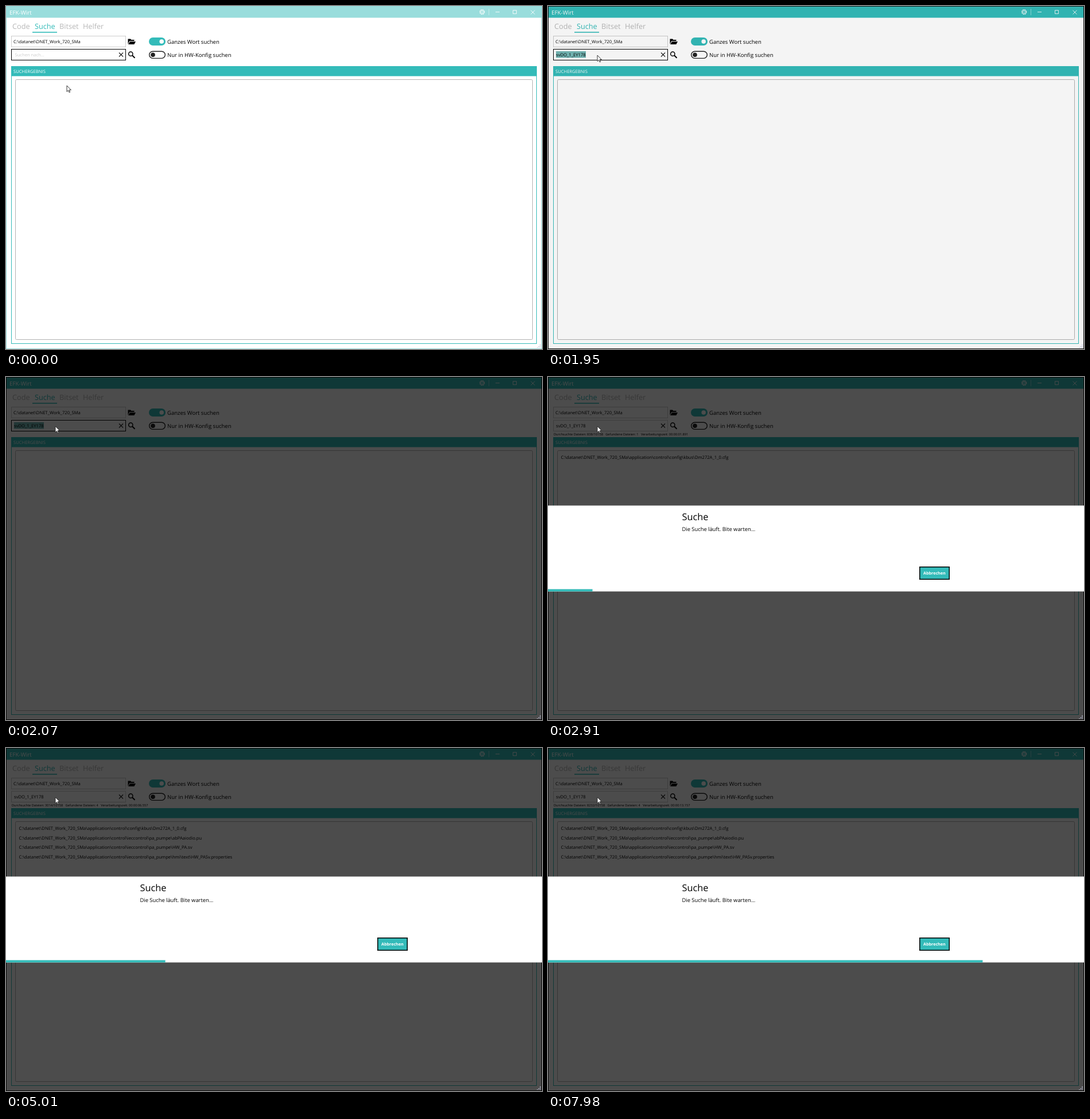
An HTML page that plays this animation: 934x599 px, repeating every 8000 ms.

```html
<!DOCTYPE html>
<html lang="de">
<head>
<meta charset="utf-8">
<title>Suche</title>
<style>
  html, body { margin: 0; width: 100%; height: 100%; overflow: hidden; background: #fff; }
  svg { display: block; width: 934px; height: 599px; }
  text {
    font-family: "Open Sans", "Noto Sans", sans-serif; font-size: 7.62px;
    text-rendering: geometricPrecision; white-space: pre;
  }
  .tab { font-size: 12.7px; fill: #b8b8b8; }
  .label { font-size: 9.5px; }
  .teal { fill: #33bbb9; }
  .white { fill: #fff; }
  .line { fill: none; stroke: #b2b2b2; }
  .icon { fill: none; stroke: #fff; opacity: .85; }
</style>
</head>
<body>
<svg id="stage" viewBox="0 0 934 599" xmlns="http://www.w3.org/2000/svg">
  <rect class="white" width="934" height="599"/>

  <rect id="titleBar" width="934" height="20.5"/>
  <text class="white" x="6" y="14.5" style="font-size:9.8px">EFK-Wirt</text>
  <g class="icon">
    <circle cx="829.7" cy="10.5" r="3.9" stroke-width="1.6" stroke-dasharray="2 1.06"/>
    <circle cx="829.7" cy="10.5" r="3"/>
    <circle cx="829.7" cy="10.5" r="1.1" stroke-width=".7"/>
    <path d="M841.5 5v11" opacity=".5"/>
    <path d="M853 10.5h7M883.5 7.5h6v6h-6zM914.5 7.5l7 7m0-7l-7 7"/>
  </g>

  <text class="tab" x="11" y="40">Code</text>
  <text class="tab" x="50" y="40" style="fill:#33bbb9">Suche</text>
  <text class="tab" x="93" y="40">Bitset</text>
  <text class="tab" x="134" y="40">Helfer</text>
  <rect class="teal" x="46" y="45" width="43" height="1.6"/>

  <rect x="9.5" y="52.5" width="199" height="19" fill="none" stroke="#ccc"/>
  <text x="13" y="65">C:\datanet\DNET_Work_720_SMa</text>
  <path d="M212.5 66.5V57.5h4.5l1.3 1.5h5.2v2h-8.2zM216 62h10l-2.6 5h-10.4z"/>

  <rect id="searchBox" x="9.5" y="75.5" width="199" height="19" fill="none"/>
  <rect id="selection" x="14" y="79" width="52" height="11.5" fill="#74b8b6"/>
  <text id="hint" x="15.5" y="88" fill="#ccc">Suchen nach...</text>
  <text id="query" x="14" y="88"></text>
  <rect id="caret" x="14" y="79" width="1" height="11"/>
  <path d="M197 81.5l7 7m0-7l-7 7" stroke="#222" stroke-width="1.2"/>
  <circle cx="217.3" cy="83.7" r="3.6" fill="none" stroke="#000" stroke-width="1.5"/>
  <path d="M220 86.3l4.5 4.5" stroke="#000" stroke-width="2"/>

  <rect class="teal" x="249" y="55" width="29" height="14" rx="7"/>
  <circle class="white" cx="271.2" cy="62" r="3.8"/>
  <text class="label" x="281" y="65.7">Ganzes Wort suchen</text>
  <rect x="249.7" y="79.2" width="27.6" height="12.2" rx="6.1" fill="none" stroke="#222" stroke-width="1.4"/>
  <circle cx="256" cy="85.3" r="3.8" fill="#222"/>
  <text class="label" x="281" y="89">Nur in HW-Konfig suchen</text>

  <text id="status" x="10" y="102.2" style="font-size:5.64px"></text>

  <rect x="9.5" y="105.5" width="915" height="484" fill="none" stroke="#33bbb9"/>
  <rect class="teal" x="9" y="105" width="916" height="17.5"/>
  <text class="white" x="13" y="117">SUCHERGEBNIS</text>
  <rect class="line" x="16.5" y="128.5" width="901" height="454" rx="2"/>
  <g id="results"></g>

  <g id="dropdown">
    <rect x="9.5" y="95.5" width="199" height="134" fill="#fff" stroke="#bbb"/>
    <rect id="highlight" x="10" width="189" height="25" fill="#99dddc"/>
    <g id="history"></g>
    <rect x="200" y="96" width="8" height="133" fill="#eee"/>
    <rect x="201.5" y="98" width="5" height="70" fill="#bbb"/>
  </g>

  <rect id="frame" x=".5" y=".5" width="933" height="598" fill="none"/>
  <rect id="shade" width="934" height="599"/>

  <g id="dialog">
    <rect y="224.5" width="934" height="150" fill="#fff"/>
    <text x="233.5" y="250" style="font-size:16.3px">Suche</text>
    <text x="233.5" y="268.8" style="font-size:9.35px">Die Suche läuft. Bite warten...</text>
    <rect class="teal" x="647.75" y="331.75" width="51.5" height="21.5" stroke="#000" stroke-width="1.5"/>
    <text class="white" x="654" y="345.3" style="font-size:7.2px;font-weight:700">Abbrechen</text>
    <rect id="progress" class="teal" y="370.5" height="4"/>
  </g>

  <path d="M931 591v6M928.5 594v3M926 596v1" stroke="#c3c3dc" stroke-width="1.4" stroke-dasharray="1.5 1"/>
  <path id="cursor" d="M.5 .5v10.6l2.5-2.3 1.6 3.7 1.6-.7-1.6-3.6h3.3z" fill="#fff" stroke="#222" stroke-width=".9"/>
</svg>

<script>
  const LOOP = 8000, STEP = 30, TOTAL = 10158;
  const ACTIVATE = 30, DIM_START = 1910, DIM_END = 2070, DIALOG = 2220;
  const $ = id => document.getElementById(id);
  const set = (id, attrs) => {
    for (const key in attrs) $(id).setAttribute(key, attrs[key]);
  };
  const show = (id, on) => set(id, { visibility: on ? "visible" : "hidden" });
  const ramp = (t, from, to) => Math.max(0, Math.min(1, (t - from) / (to - from)));
  const lerp = (a, b, k) => a + (b - a) * k;

  function addText(parent, x, y, content) {
    const node = document.createElementNS("http://www.w3.org/2000/svg", "text");
    node.setAttribute("x", x);
    node.setAttribute("y", y);
    node.textContent = content;
    $(parent).append(node);
    return node;
  }

  const root = "C:\\datanet\\DNET_Work_720_SMa\\application\\control\\";
  const results = [
    [2600, "config\\kbus\\Dm272A_1_0.cfg"],
    [4200, "ieccontrol\\pa_pumpe\\abPAaiodio.pu"],
    [4290, "ieccontrol\\pa_pumpe\\HW_PA.sv"],
    [4380, "ieccontrol\\pa_pumpe\\hmi\\text\\HW_PASv.properties"]
  ].map(([at, path], i) => ({ at, node: addText("results", 22.5, 143 + i * 16.7, root + path) }));

  const history = ["svDO_1_EY177", "svDO_1_EY178", "svDO_1_EY179", "svDO_1_EY180", "svDO_1_EY181"];
  history.forEach((entry, i) => addText("history", 15, 112.5 + i * 25, entry));

  // [time, files searched]
  const pace = [[2070, 0], [2910, 838], [5010, 3014], [5430, 3415], [6240, 4460],
    [6510, 4926], [7050, 6160], [7860, 7975], [7980, 8232]];

  function filesAt(t) {
    const i = Math.max(1, pace.findIndex(p => p[0] >= t));
    const [a, b] = [pace[i - 1], pace[i]];
    return Math.round(lerp(a[1], b[1], ramp(t, a[0], b[0])));
  }

  function drawWindow(t) {
    const active = t >= ACTIVATE;
    set("titleBar", { fill: active ? "#33bbb9" : "#99dddc" });
    set("frame", { stroke: active ? "#111" : "#99dddc" });
    set("searchBox", { stroke: t < DIALOG ? "#000" : "#ccc" });
    set("shade", { opacity: .7 * ramp(t, DIM_START, DIM_END) ** 2 });
  }

  function drawSearchBox(t) {
    const pick = t < 1230 ? -1 : t < 1410 ? 0 : 1;
    $("query").textContent = history[pick] || "";
    show("hint", pick < 0);
    show("selection", pick >= 0 && t < DIALOG);
    show("caret", t >= ACTIVATE && t < 510);

    set("dropdown", { opacity: ramp(t, 630, 930) * (1 - ramp(t, 1620, 1740)) });
    set("highlight", { y: 97 + Math.max(0, pick) * 25 });
    show("highlight", pick >= 0);

    const k = ramp(t, 0, 330), move = k * k * (3 - 2 * k);
    set("cursor", { transform: `translate(${lerp(105.5, 85.5, move)} ${lerp(138.5, 85.5, move)})` });
  }

  function drawSearch(t) {
    const files = filesAt(t);
    const found = results.filter(r => t >= r.at).length;
    results.forEach(r => r.node.setAttribute("visibility", t >= r.at ? "visible" : "hidden"));

    const seconds = Math.max(0, 1.891 + (t - 2910) * .002222);
    const clock = "00:00:" + seconds.toFixed(3).padStart(6, "0");
    $("status").textContent = t < DIALOG ? "" :
      `Durchsuchte Dateien: ${files}/${TOTAL}   Gefundene Dateien: ${found}   Verarbeitungszeit: ${clock}`;

    set("dialog", { opacity: ramp(t, DIALOG - STEP, DIALOG + 2 * STEP) });
    set("progress", { width: files / TOTAL * 934 + .5 });
  }

  function draw(time) {
    const t = Math.floor(time % LOOP / STEP) * STEP;
    drawWindow(t);
    drawSearchBox(t);
    drawSearch(t);
  }

  const start = performance.now();
  function tick() {
    draw(performance.now() - start);
    requestAnimationFrame(tick);
  }
  tick();
</script>
</body>
</html>
```
